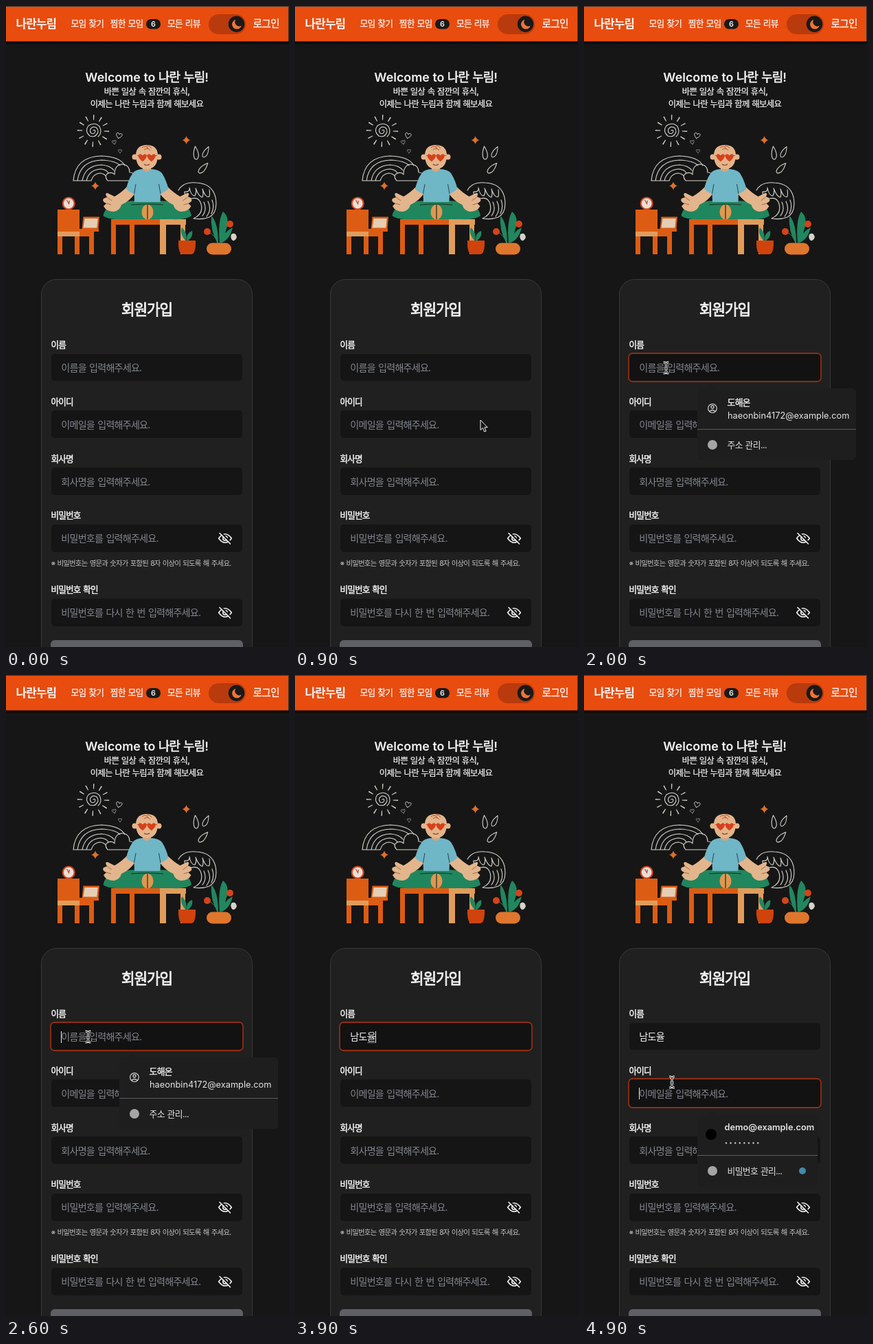
These frames come from a looping animation (412x932 px, 5000 ms). An HTML page:

```html
<!DOCTYPE html>
<html lang="ko">
<head>
<meta charset="utf-8">
<title>회원가입</title>
<style>
html, body { margin: 0; width: 100%; height: 100%; overflow: hidden; background: #161616; }
svg { display: block; }
text { font-family: Inter, "Noto Sans CJK KR", "Noto Sans CJK", sans-serif; fill: #f4f4f4; }
.k { letter-spacing: -.05em; word-spacing: .07em; }
.m { font-weight: 500; stroke: #f4f4f4; stroke-width: .02em; }
.s { font-weight: 500; stroke: #f4f4f4; stroke-width: .036em; }
.b { font-weight: 600; }
.c { text-anchor: middle; }
.label { font-size: 12.6px; }
.input { font-size: 14.1px; }
.hint { fill: #83868e; }
.field { fill: #151515; }
.ring { fill: #121212; stroke: #8f2e12; stroke-width: 1.8; }
.pop text { font-size: 12.8px; fill: #e3e3e3; }
.pop path, .pop rect { fill: #1e1e1f; }
.pop .rule { fill: #5c5c5e; }
.chalk { fill: none; stroke: #d5d4cd; stroke-width: 1.1; stroke-linecap: round; stroke-linejoin: round; }

.ring, .pop, #caret, #caret2, #arrow, #beam { opacity: 0; animation: 5s step-end infinite; }
#ring1 { animation-name: ring1; }
#ring2, #caret2 { animation-name: ring2; }
#address { animation-name: address; }
#guess { animation-name: guess; }
#login { animation-name: login; }
#caret { animation-name: caret; }
#arrow { animation-name: arrow; }
#beam { animation-name: beam; }
#cursor { animation: move 5s step-end infinite; }

@keyframes ring1 { 0%, 92%, 100% { opacity: 0 } 26% { opacity: 1 } }
@keyframes ring2 { 0% { opacity: 0 } 92%, 100% { opacity: 1 } }
@keyframes address { 0%, 54%, 100% { opacity: 0 } 30% { opacity: 1 } }
@keyframes guess { 0%, 76%, 100% { opacity: 0 } 58% { opacity: 1 } }
@keyframes login { 0% { opacity: 0 } 94%, 100% { opacity: 1 } }
@keyframes caret { 0%, 38%, 92%, 100% { opacity: 0 } 28%, 48% { opacity: 1 } }
@keyframes arrow { 0%, 24%, 88%, 100% { opacity: 0 } 18%, 84% { opacity: 1 } }
@keyframes beam { 0%, 54%, 84% { opacity: 0 } 24%, 80%, 88%, 100% { opacity: 1 } }
@keyframes move {
  0%, 18% { transform: translate(270px, 602px) }
  20% { transform: translate(222px, 572px) }
  22% { transform: translate(160px, 547px) }
  24% { transform: translate(119px, 530px) }
  26% { transform: translate(116.5px, 527.5px) }
  30% { transform: translate(118px, 527px) }
  34%, 80% { transform: translate(119.5px, 526px) }
  82% { transform: translate(120px, 534px) }
  84% { transform: translate(123px, 555px) }
  86% { transform: translate(126px, 575px) }
  88% { transform: translate(128px, 590px) }
  90%, 100% { transform: translate(128px, 592px) }
}
</style>
</head>
<body>
<svg width="412" height="932" viewBox="0 0 412 932">
  <defs>
    <linearGradient id="shade" x2="0" y2="1">
      <stop stop-color="#030303"/><stop offset=".5" stop-color="#080808"/><stop offset="1" stop-color="#161616"/>
    </linearGradient>
    <path id="heart" d="M0 5C-7 0-6-4.500-3-4.500Q-.8-4.500 0-2.200Q.8-4.500 3-4.500C6-4.500 7 0 0 5Z"/>
    <path id="drop" d="M0-10Q4-2 3.500 4Q2 9 0 9Q-3 9-3.500 4Q-4-2 0-10Z"/>
    <path id="star" d="M0-6Q1.300-1.300 6 0Q1.300 1.300 0 6Q-1.300 1.300-6 0Q-1.300-1.300 0-6Z" fill="#df7029"/>
    <g id="eye" fill="none" stroke="#f4f4f4" stroke-width="1.600" stroke-linecap="round">
      <path d="M-9.300 0Q-5-6.300 0-6.300T9.300 0Q5 6.300 0 6.300T-9.300 0Z"/>
      <circle r="3.200"/>
      <path d="M-6.800-9L9 6.800" stroke="#151515" stroke-width="2"/>
      <path d="M-8-7.500L7.500 8"/>
    </g>
  </defs>

  <!-- header -->
  <rect width="412" height="52" fill="#e84c0e"/>
  <path d="M0 .5H411.500V52" fill="none" stroke="#333"/>
  <rect y="51.500" width="412" height="4.500" fill="url(#shade)"/>
  <text class="k" x="14.500" y="32" font-size="16.900" font-weight="900">나란누림</text>
  <g class="k" font-size="12.700">
    <text class="m" x="94.500" y="30.300">모임 찾기</text>
    <text class="m" x="151.800" y="30.300">찜한 모임</text>
    <text class="m" x="235" y="30.300">모든 리뷰</text>
    <text class="m" x="359.500" y="31" font-size="14.600">로그인</text>
  </g>
  <rect x="204" y="19" width="21" height="14.500" rx="7.200" fill="#191919"/>
  <text class="b c" x="214.500" y="30" font-size="10.800">6</text>
  <rect x="295" y="12" width="54" height="29" rx="14.500" fill="#b93a0d"/>
  <circle cx="335.500" cy="26.300" r="11.700" fill="#191919"/>
  <path d="M334.500 19.800A7 7 0 1 0 342.800 28.600A6.200 6.200 0 0 1 334.500 19.800Z" fill="#f07436"/>

  <text class="b c" x="205.200" y="110" font-size="17.900">Welcome to <tspan class="k s">나란 누림</tspan>!</text>
  <g class="k c" font-size="12.350">
    <text class="m" x="205" y="129">바쁜 일상 속 잠깐의 휴식,</text>
    <text class="m" x="205" y="147">이제는 나란 누림과 함께 해보세요</text>
  </g>

  <!-- chalk doodles -->
  <g class="chalk">
    <circle cx="127" cy="181.500" r="19.500" stroke-width="7.500" stroke-linecap="butt" pathLength="120" stroke-dasharray="1.300 8.700"/>
    <path d="M127 181Q129 179 130 182Q129 187 124 185Q120 180 126 176Q134 175 134 183Q131 192 122 189Q114 182 120 174Q129 168 136 175Q141 184 134 190"/>
    <use href="#heart" transform="translate(164.500 188.500) rotate(15) scale(.8)"/>
    <use href="#heart" transform="translate(157.500 198) rotate(-12) scale(.55)"/>
    <use href="#heart" transform="translate(166 211) scale(.5)"/>
    <path d="M98 254Q101 219 139 218Q166 219 173 232M104 254Q108 225 139 224Q160 225 166 232M111 254Q115 232 139 231Q152 232 157 239M117 254Q121 238 138 237Q147 238 149 243M124 254Q127 244 137 243Q143 244 145 247M98 254H124"/>
    <path d="M148 254Q142 247 149 243Q155 241 158 245Q158 231 169 230Q180 231 180 242Q187 242 187 248Q187 254 181 254H148"/>
    <use href="#drop" transform="translate(276.500 214) rotate(-6)"/>
    <use href="#drop" transform="translate(291 212.500) rotate(27) scale(.9)"/>
    <use href="#drop" transform="translate(287 236) rotate(42)"/>
    <path d="M251 268Q258 255 277 257Q300 258 305 278Q309 300 296 307Q286 311 273 309Q288 302 284 288Q281 277 270 280Q259 277 260 270Q268 271 267 264M267 264Q269 276 275 276Q278 270 276 265Q281 278 286 278Q288 272 286 266Q291 280 296 277Q297 272 296 267M288 285Q293 296 286 305M294 284Q300 296 292 306M300 282Q304 292 299 302"/>
  </g>
  <use href="#star" x="262.500" y="195"/>
  <use href="#star" x="130" y="261.500"/>

  <!-- desk, frame and clock -->
  <g fill="#dd5c13">
    <path d="M75 296H107V324H128V361H121V335H107V361H100V335H82V361H75Z"/>
    <path d="M112.500 306.500H136L134.500 325H110.500Z"/>
    <path d="M107 324H135V328H107Z"/>
  </g>
  <path d="M75 328H107V335H75Z" fill="#e19c5b"/>
  <path d="M114.500 309H133.800L132.300 322.500H112.500Z" fill="#e5ceb3"/>
  <circle cx="91.200" cy="287" r="8.500" fill="#eadfd6" stroke="#d6431a" stroke-width="2.200"/>
  <path d="M88.500 282L91.500 287.500L92.500 283" fill="none" stroke="#b64828" stroke-width="1.200"/>

  <!-- bench -->
  <path d="M153 310H262V318H261V361H254V318H187V361H180V318H160V361H153Z" fill="#dd5c13"/>
  <path d="M224 310H262V318H233V361H224ZM254 318H261V361H254Z" fill="#e19c5b"/>

  <!-- sitter -->
  <path d="M141.500 305Q144 291 162 286Q184 281 206 285Q230 281 250 286Q268 291 270 305Q262 311 242 310H170Q148 311 141.500 305Z" fill="#20865d"/>
  <g id="arm">
    <path d="M176 263Q167 272 158 277L148 272Q143 271 147 278L142 280Q139 284 146 287L142 291Q146 299 157 299Q166 297 168 289Q181 283 188 272Z" fill="#e3b58c"/>
    <path d="M147 278L154 283M146 287L153 289" stroke="#8c5b3b" stroke-width=".8"/>
  </g>
  <use href="#arm" transform="matrix(-1 0 0 1 411.500 0)"/>
  <path d="M199 230H211V246H199Z" fill="#d9a57a"/>
  <path d="M198.500 237Q205 245 211.500 237Q223 238 227 243Q233 252 236.500 266Q231 271 225 273L224.500 285H187L186.500 273Q180 271 175 266Q178 252 184.500 243Q188 238 198.500 237Z" fill="#6fb6c7"/>
  <path d="M186.500 273L189 259M225 273L222.500 259" stroke="#26454d"/>
  <ellipse cx="206" cy="299.500" rx="8.500" ry="11" fill="#df9850"/>
  <path d="M182 289Q206 287 229 289M206 289V310" fill="none" stroke="#1c2b25" stroke-width="1.200"/>
  <g fill="#e3b58c">
    <circle cx="187.500" cy="219.500" r="4"/><circle cx="222.500" cy="219.500" r="4"/>
    <path d="M189 216Q190 202 205 202T221 216Q221 237 205 237T189 216Z"/>
  </g>
  <path d="M198 206Q203 202 207 207M201 209Q206 205 210 210M205 203Q210 203 212 207" fill="none" stroke="#bb4a24"/>
  <g fill="#d6411c">
    <use href="#heart" transform="translate(198.800 220.500) scale(1.150)"/>
    <use href="#heart" transform="translate(211.700 220.500) scale(1.150)"/>
    <path d="M191 217H220V218H191Z"/>
  </g>
  <path d="M201 230Q205 233 209 230" fill="none" stroke="#8c3b24" stroke-width="1.200"/>

  <!-- plants -->
  <g fill="#21875f">
    <path d="M262 342Q252 331 256 322Q265 330 262 342ZM263 342Q262 330 271 327Q273 337 263 342Z"/>
    <path d="M311 345Q308 312 316 299Q326 307 321 323Q318 338 311 345ZM308 345Q297 326 299 305Q309 315 309 345ZM312 345Q317 328 330 322Q326 340 312 345Z"/>
  </g>
  <path d="M308 345Q305 333 294 328M313 344Q316 324 326 317" fill="none" stroke="#21875f"/>
  <path d="M251 341H276V348Q275 361 270 361H257Q252 361 251 348Z" fill="#d0430d"/>
  <g fill="#d6431a"><circle cx="293" cy="328" r="5"/><circle cx="326" cy="317" r="5"/></g>
  <path d="M328 332Q334 328 336 336Q334 342 330 341Q326 338 328 332Z" fill="#d3d3cb"/>
  <rect x="292" y="344.500" width="36" height="17" rx="8.500" fill="#df762d"/>

  <!-- sign-up card -->
  <rect x="51.500" y="397.500" width="307" height="570" rx="22" fill="#202020" stroke="#393939"/>
  <text class="k s c" x="205" y="449" font-size="21.300">회원가입</text>
  <g class="k">
    <text class="label s" x="65.500" y="496.800">이름</text>
    <text class="label s" x="65.500" y="579.600">아이디</text>
    <text class="label s" x="65.500" y="662.500">회사명</text>
    <text class="label s" x="65.500" y="745">비밀번호</text>
    <text class="label s" x="65.500" y="852.800">비밀번호 확인</text>
  </g>
  <rect class="field" x="66" y="506" width="278" height="39" rx="5"/>
  <rect class="field" x="66" y="588" width="278" height="40" rx="5"/>
  <rect class="field" x="66" y="671" width="278" height="40" rx="5"/>
  <rect class="field" x="66" y="754" width="278" height="40" rx="5"/>
  <rect class="field" x="66" y="862" width="278" height="40" rx="5"/>
  <rect class="ring" id="ring1" x="65" y="505" width="280" height="41" rx="5.500"/>
  <rect class="ring" id="ring2" x="65" y="587" width="280" height="42" rx="5.500"/>
  <g class="k">
    <text class="input hint" id="hint" x="80.300" y="531">이름을 입력해주세요.</text>
    <text class="input" id="name" x="80.300" y="531"></text>
    <text class="input hint" x="80.300" y="613.800">이메일을 입력해주세요.</text>
    <text class="input hint" x="80.300" y="696.800">회사명을 입력해주세요.</text>
    <text class="input hint" x="80.300" y="779">비밀번호를 입력해주세요.</text>
    <text class="input hint" x="80.300" y="887">비밀번호를 다시 한 번 입력해주세요.</text>
    <text x="65.500" y="814" font-size="10.400" style="fill:#c4c4c4">※ 비밀번호는 영문과 숫자가 포함된 8자 이상이 되도록 해 주세요.</text>
  </g>
  <path id="under" stroke="#b5b5b5" stroke-width=".8"/>
  <path id="caret" d="M80.500 518V535" stroke="#ececec"/>
  <path id="caret2" d="M80.500 600V617" stroke="#ececec"/>
  <use href="#eye" x="319" y="774"/>
  <use href="#eye" x="319" y="882"/>
  <rect x="65" y="922" width="280" height="40" rx="6" fill="#5f6065"/>

  <!-- browser suggestions -->
  <g class="pop" id="address">
    <path d="M179 556L185 550L191 556Z"/>
    <rect x="165" y="556" width="231" height="104" rx="5"/>
    <rect class="rule" x="165" y="615" width="231" height="1"/>
    <g fill="none" stroke="#c8c8c8" stroke-width="1.300">
      <circle cx="187" cy="585" r="6.300"/><circle cx="187" cy="583" r="2"/>
      <path d="M182.800 589.500Q187 585.500 191.200 589.500" style="fill:none"/>
    </g>
    <text class="k s" x="208.500" y="580.500">도해온</text>
    <text x="209" y="599.500">haeonbin4172@example.com</text>
    <circle cx="187" cy="638" r="7" fill="#a5a5a5"/>
    <text class="k" x="208.500" y="642.800">주소 관리...</text>
  </g>
  <g class="pop" id="guess">
    <path d="M179 556L185 550L191 556Z" style="fill:#1a1a1a"/>
    <rect x="164.500" y="555.500" width="157" height="43.500" rx="5" style="fill:#1a1a1a"/>
    <text class="k s" x="176.500" y="582">남도율</text>
  </g>
  <g class="pop" id="login">
    <path d="M179 639L185 633L191 639Z"/>
    <rect x="165" y="639" width="175" height="106" rx="5"/>
    <rect class="rule" x="165" y="698" width="175" height="1"/>
    <circle cx="185" cy="668" r="8" fill="#000"/>
    <text class="b" x="204.500" y="662">demo@example.com</text>
    <path d="M207 680.500H253.500" stroke="#c4c4c4" stroke-width="2.600" stroke-linecap="round" stroke-dasharray="0 6.600"/>
    <circle cx="187" cy="721" r="7" fill="#a5a5a5"/>
    <text class="k" x="208.500" y="726">비밀번호 관리...</text>
    <circle cx="318" cy="721" r="5" fill="#4589a8"/>
  </g>

  <g id="cursor" stroke-linejoin="round">
    <path id="arrow" d="M0 0V14.500L3.300 11.500L5.700 17L8.200 16L5.900 10.700H10.300Z" fill="#151515" stroke="#f4f4f4"/>
    <g id="beam" fill="none">
      <path id="bar" d="M-4-8Q0-8 0-5Q0-8 4-8M0-5V5M-4 8Q0 8 0 5Q0 8 4 8M-2.500 1H2.500" stroke="#f4f4f4" stroke-width="3"/>
      <path d="M-4-8Q0-8 0-5Q0-8 4-8M0-5V5M-4 8Q0 8 0 5Q0 8 4 8M-2.500 1H2.500" stroke="#151515"/>
    </g>
  </g>
</svg>
<script>
const loop = 5000, left = 80.5;
const typing = [[0, ""], [2700, "ㄴ"], [2900, "나"], [3100, "남"], [3400, "남ㄷ"],
  [3500, "남도"], [3600, "남동"], [3700, "남도유"], [3800, "남도율"]];
const el = id => document.getElementById(id);
const entry = el("name"), hint = el("hint"), caret = el("caret"), under = el("under");
let start;

function draw(now) {
  start ??= now;
  const t = (now - start) % loop;
  const value = typing.findLast(([from]) => from <= t)[1];
  if (entry.textContent !== value) entry.textContent = value;
  const width = value ? entry.getComputedTextLength() : 0;
  const x = left + width + (value ? .5 : 0);
  hint.style.opacity = value ? 0 : 1;
  caret.setAttribute("d", `M${x} 518V535`);
  // the syllable being composed is underlined until the field loses focus
  const composing = value && t < 4600;
  under.setAttribute("d", composing ? `M${x - width / value.length} 534.5H${x - 1}` : "");
  requestAnimationFrame(draw);
}
requestAnimationFrame(draw);
</script>
</body>
</html>
```
